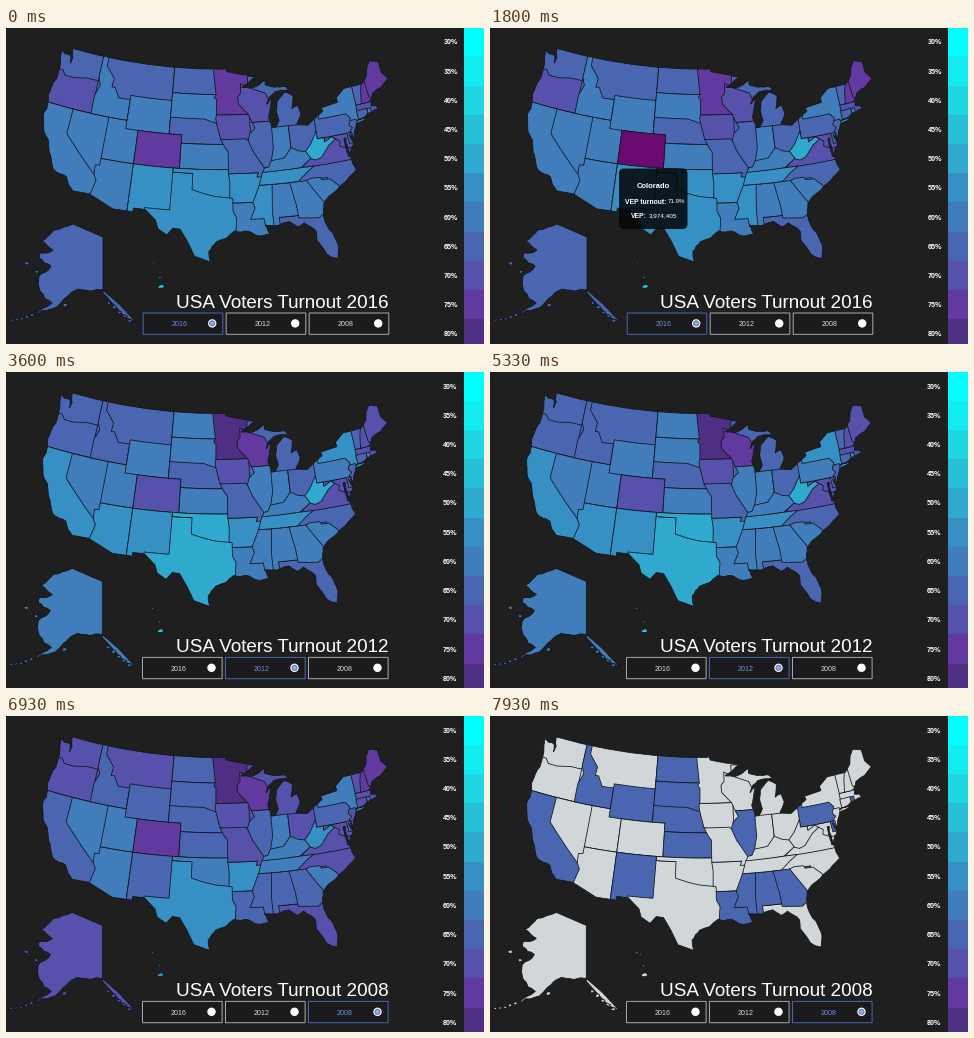
Write a matplotlib script that moves like this. It is 478x316 px and loops after 8000 ms.

```python
import numpy as np
import matplotlib.pyplot as plt
from matplotlib.animation import FuncAnimation
from matplotlib.patches import Circle, FancyBboxPatch, Rectangle

W, H, DPI = 478, 316, 100
PX = 72 / DPI
STEP_MS, FRAMES = 200, 40
SCENE_FRAMES = 9

BG, INK, BLUE, GREY = "#1f1f1f", "#12151c", "#4a66b0", "#d1d6d8"
HOVER = "#6b0a70"
SCALE = ["#00fffe", "#12ecf0", "#1ed6e0", "#26bfd6", "#2fa9ce", "#3690c4",
         "#417dbb", BLUE, "#5651aa", "#623a9f", "#4f2f83"]

# Turnout class (percent) per year; states not listed fall in the 65 class
TURNOUT = {
    2016: {75: "CO MN NH ME", 70: "OR IA WI VA MA MD",
           60: "CA NV ID WY UT AZ SD KS LA IN KY AL GA SC NY RI",
           55: "NM OK TX AR TN MS", 50: "WV", 45: "HI"},
    2012: {80: "MN", 75: "WI", 70: "CO IA VA NH ME MA MD",
           60: "NV WY UT ND SD KS LA IL IN KY MS AL GA SC PA RI AK",
           55: "CA AZ NM AR TN NY", 50: "OK TX WV", 45: "HI"},
    2008: {80: "MN", 75: "CO WI NH ME",
           70: "WA OR MT IA MO MI OH FL NC VA VT MA CT NJ MD AK",
           60: "NV UT AZ OK IN KY TN SC NY", 55: "TX AR WV HI"},
}

rng = np.random.default_rng(4)
fig = plt.figure(figsize=(W / DPI, H / DPI), dpi=DPI, facecolor=BG)
ax = fig.add_axes([0, 0, 1, 1])
ax.axis("off")
regions = {}


def albers(pts):
    """Equal-area conic, degrees west and north to pixels."""
    lon, lat = pts.T
    s1, s2 = np.sin(np.radians([29.5, 45.5]))
    n = (s1 + s2) / 2
    rho = np.sqrt(1 - s1 ** 2 + 2 * n * (s1 - np.sin(np.radians(lat)))) / n
    theta = n * np.radians(96 - lon)
    return np.column_stack([213.3 + 478 * rho * np.sin(theta),
                            478 * rho * np.cos(theta) - 485.5])


def path(*v):
    return np.reshape(v, (-1, 2)).astype(float)


def dense(pts, k=6):
    """Subdivide each side so that parallels bend."""
    t = np.arange(k * (len(pts) - 1) + 1) / k
    i = np.arange(len(pts))
    return np.column_stack([np.interp(t, i, c) for c in pts.T])


def rough(pts, amp=0.09, levels=2):
    """Ragged shoreline by midpoint displacement."""
    for _ in range(levels):
        step = np.diff(pts, axis=0)
        push = rng.uniform(-amp, amp, (len(step), 1))
        mids = pts[:-1] + step / 2 + push * step[:, ::-1] * [-1, 1]
        pts = np.vstack([np.stack([pts[:-1], mids], 1).reshape(-1, 2), pts[-1:]])
    return pts


def fill(code, pts, **kw):
    patch, = ax.fill(*pts.T, ec=INK, lw=0.8 * PX, joinstyle="round", **kw)
    regions.setdefault(code, []).append(patch)
    return patch


# Outline of the mainland; every state is clipped to it
pacific = path(122.76, 49, 122.3, 47.9, 122.5, 47.2, 122.8, 48.1, 124.7, 48.4, 124.1, 46.8,
               124, 45, 124.55, 42.8, 124.1, 41.2, 124.35, 40.4, 123.7, 38.9, 122.5, 37.7,
               121.9, 36.4, 120.6, 34.5, 118.5, 34.03, 117.12, 32.53)
mexico = path(114.72, 32.6, 111.07, 31.33, 108.2, 31.33, 108.2, 31.78, 106.53, 31.78,
              104.9, 30.6, 104.5, 29.65, 103.2, 28.98, 102.4, 29.85, 101.4, 29.77,
              100.3, 28.3, 99.3, 26.6)
gulf = path(97.15, 25.95, 97.4, 27.2, 96.4, 28.4, 93.85, 29.7, 92, 29.6, 90.9, 29.05,
            89, 29.1, 89.5, 30.2, 86.2, 30.4, 85.2, 29.65, 84.2, 30.05, 82.7, 28.8,
            82.8, 27.8, 81.75, 25.95, 80.4, 25.2)
atlantic = path(80.05, 26.5, 80.55, 28.4, 81.4, 30.4, 81.1, 32, 79.2, 33.2, 77.95, 33.9,
                75.55, 35.25, 76, 36.9, 76.3, 37, 76.45, 38.3, 76.4, 39.2, 76.1, 39.2,
                76.2, 38.4, 75.95, 37.15, 75.05, 38.45, 75.5, 39.5, 74.95, 38.95, 74, 40.55,
                71.9, 41.05, 73.8, 40.85, 73.6, 41, 71.2, 41.5, 70, 41.65, 70.2, 42.07,
                71, 42.2, 70.7, 43, 70.2, 43.6, 67, 44.8)
canada = path(67.8, 45.7, 67.8, 47.07, 69.23, 47.45, 70, 46.7, 70.4, 45.8, 71.5, 45,
              74.7, 45, 76.3, 44.1, 76.2, 43.55, 79.05, 43.27, 78.9, 42.85, 81.7, 41.5)
lakes = path(83.45, 41.73, 82.5, 43, 82.95, 44.05, 83.9, 43.7, 83.4, 45.2, 84.75, 45.77,
             86.25, 44.7, 86.5, 43.6, 86.2, 42.5, 86.9, 41.7, 87.5, 41.7, 87.9, 43,
             87, 45.25, 88, 44.55, 87.4, 45.4, 86.5, 45.9, 84, 46, 84.6, 46.45, 86.5, 46.5,
             88, 46.9, 87.9, 47.45, 90.4, 46.6, 92.1, 46.75, 89.6, 48)
north = path(92, 48.3, 94.6, 48.7, 95.15, 49.38, 95.15, 49, 122.76, 49)
outline = np.vstack([rough(pacific), mexico, rough(gulf), rough(atlantic), canada,
                     rough(lakes, 0.05), dense(north)])
land, = ax.fill(*albers(outline).T, fc="none", ec=INK, lw=0.8 * PX, zorder=3)


def state(code, *v):
    pts = path(*v)
    patch = fill(code, albers(dense(np.vstack([pts, pts[:1]]))))
    patch.set_clip_path(land)


def box(code, west, east, south, top):
    state(code, west, top, east, top, east, south, west, south)


# Painted in order: each state overlaps earlier neighbours, so a border is given once
box("WA", 126, 116, 45, 50)
state("OR", 126, 46.2, 123.4, 46.2, 122.8, 45.65, 121.2, 45.65, 119, 46, 115, 46, 115, 42, 126, 42)
box("CA", 126, 114, 32, 42)
state("NV", 120, 42, 113, 42, 113, 35, 114.63, 35, 120, 39)
box("MT", 117, 104.05, 44, 50)
box("UT", 114.04, 109.05, 37, 42)
state("AZ", 114.04, 37, 109.05, 37, 109.05, 31, 115, 31, 114.5, 33, 114.14, 34.3,
      114.63, 35, 114.7, 36.1, 114.04, 36.2)
state("ID", 117.03, 50, 116.05, 50, 116.05, 48, 114.4, 46.65, 114.5, 45.6, 113.9, 45.6,
      113, 44.45, 111.05, 44.5, 111.05, 42, 117.03, 42, 117.1, 44.2, 116.5, 45.5, 117.03, 46.4)
box("WY", 111.05, 104.05, 41, 45)
box("ND", 104.05, 95, 45.94, 50)
box("SD", 104.05, 95, 42, 45.94)
state("NE", 104.05, 43, 98.5, 43, 96.45, 42.5, 94, 42, 94, 40, 102.05, 40, 102.05, 41, 104.05, 41)
box("KS", 102.05, 94, 37, 40)
box("CO", 109.05, 102.05, 37, 41)
box("TX", 107, 93, 25, 36.5)
state("OK", 103, 37, 94, 37, 94, 33.6, 96.5, 33.8, 98.1, 34.1, 100, 34.56, 100, 36.5, 103, 36.5)
state("NM", 109.05, 37, 103, 37, 103.06, 32, 106.62, 32, 106.5, 31, 109.05, 31)

state("MN", 97.23, 50, 96.56, 45.94, 96.85, 45.6, 96.45, 45.3, 96.45, 43.5, 89, 43.5, 89, 50)
state("IA", 96.45, 43.5, 90, 43.5, 90, 40.3, 91.6, 40.3, 95.77, 40.58, 96.45, 42.5, 96.6, 43.1)
state("AR", 94.62, 36.5, 89, 36.5, 89, 33, 94.04, 33, 94.04, 33.55, 94.48, 33.64, 94.43, 35.4)
state("MO", 95.77, 40.58, 91.73, 40.6, 91.42, 40.38, 89, 39, 89, 36, 90.37, 36, 90.1, 36.5,
      94.62, 36.5, 94.62, 39.1, 95.1, 39.6)
state("LA", 94.04, 33, 89, 33, 88, 28, 93.85, 28, 93.55, 31.2, 94.04, 32)
state("MS", 90.1, 35, 88, 35, 88, 30, 89.55, 30, 89.73, 31, 91.6, 31, 90.9, 32.3, 91.17, 33)
box("FL", 88, 79, 24, 31)
state("AL", 88.2, 35, 85, 35, 84.5, 31, 87.6, 31, 87.5, 30, 88.4, 30, 88.47, 31.9)

box("MI", 91, 82, 41, 48)
state("WI", 92.3, 47.2, 90.4, 46.55, 88.1, 45.9, 87.6, 45.1, 86.5, 45, 87, 42.5,
      90.64, 42.5, 91.2, 43.5, 92.75, 44.75, 92.87, 45.6, 92.29, 46.1)
state("IL", 90.64, 42.5, 87, 42.5, 87, 37, 89.15, 37, 90.2, 38.4, 90.7, 39,
      91.42, 40.38, 91.1, 41.2, 90.2, 41.8)
state("IN", 87.53, 41.74, 84.8, 41.74, 84.8, 38, 88.05, 37.7, 87.53, 39.35)
state("OH", 84.8, 41.72, 83.4, 41.73, 80, 42.5, 80, 38, 84.8, 38)

box("NY", 80, 71.5, 40.3, 45.3)
box("NJ", 76, 73.9, 38.8, 41.1)
box("MD", 79.48, 75, 37.9, 39.72)
state("DE", 75.79, 39.72, 75.3, 39.9, 74.9, 38.45, 75.7, 38.46)
state("PA", 80.52, 43, 79.76, 43, 79.76, 42, 75.35, 42, 74.7, 41.36, 75.2, 40.65,
      74.75, 40.2, 75.4, 39.72, 80.52, 39.72)
state("VA", 83.68, 36.5, 75, 36.5, 75, 37.95, 76.2, 37.95, 77.3, 38.4, 77.1, 38.95,
      78, 39.5, 82, 37.6)
box("NC", 84.5, 75, 33.5, 36.57)
state("WV", 80.52, 40.64, 80.52, 39.72, 79.48, 39.72, 79.48, 39.2, 78.3, 39.65, 77.72, 39.32,
      78.87, 38.76, 80.3, 37.5, 81.2, 37.25, 82, 37.5, 82.7, 38.4, 81.7, 39.2)
state("KY", 89.5, 36.4, 83.68, 36.6, 81.97, 37.54, 82.6, 38.42, 83.7, 38.63, 84.8, 39.1,
      86, 38, 88.05, 37.8, 88.5, 37.1, 89.15, 37)
state("TN", 90.1, 35, 84.32, 35, 82.9, 35.95, 81.68, 36.59, 83.68, 36.6, 89.5, 36.5)
state("GA", 85.6, 35, 80, 35, 80, 30.72, 81.5, 30.72, 82.05, 30.4, 84.86, 30.7, 85, 32.3)
state("SC", 83.1, 35, 82.4, 35.2, 81.05, 35.15, 80.8, 34.82, 79.67, 34.8, 78.55, 33.86,
      78, 32, 80.9, 32, 82, 33.5)
box("MA", 73.4, 69, 41.3, 42.73)
box("RI", 71.8, 71.2, 41, 42.02)
box("CT", 73.5, 71.8, 41, 42.04)
box("VT", 73.35, 71.3, 42.73, 45.3)
box("ME", 71.2, 66, 43, 48)
state("NH", 71.5, 45.4, 71.05, 45.4, 70.95, 43.3, 70.6, 42.9, 71.3, 42.7, 72.46, 42.73, 72.05, 44.2)


def islet(code, x, y, r):
    a = np.arange(7) * 2 * np.pi / 7
    fill(code, np.column_stack([x + r * np.cos(a), y + 0.7 * r * np.sin(a)])
         + rng.uniform(-0.3, 0.3, (7, 2)) * r)


# Insets, placed in pixels
shore = path(97, 262, 89, 262, 72, 261, 62, 268, 45, 281, 29, 287, 46, 275, 34, 263,
             33, 248, 45, 238, 33, 230, 34, 225, 47, 222, 36, 213, 48, 202, 67, 196)
handle = path(97, 209, 97, 262, 113, 276, 130, 294, 119, 289, 97, 265)
fill("AK", np.vstack([rough(shore, 0.12), handle]))
for t in np.linspace(0, 1, 5):
    islet("AK", 6 + 20 * t, 292 - 5 * t ** 2, 1.8)
    islet("AK", 103 + 21 * t, 275 + 18 * t, 2.2)
for x, y in ((21, 235), (31, 244), (59, 277)):
    islet("AK", x, y, 2.2)
for x, y, r in ((147.5, 236, 1.2), (151.5, 238, 1.2), (154, 249.5, 1.3), (155.6, 259, 3)):
    islet("HI", x, y, r)


def label(x, y, text, size, color="white", **kw):
    kw = {"ha": "center", "va": "center_baseline", "zorder": 6, **kw}
    return ax.text(x, y, text, fontsize=size * PX, color=color,
                   family="Liberation Sans", **kw)


# Colour scale
for i, c in enumerate(SCALE):
    mid = 13.8 + 29.2 * i
    ax.add_patch(Rectangle((458.4, mid - 14.6), 25, 29.8, fc=c, lw=0))
    label(452, mid, f"{30 + 5 * i}%", 7.2, ha="right", weight="bold")

title = label(383, 280, "", 18.85, ha="right", va="baseline")

# Year buttons
buttons = {}
for i, year in enumerate((2016, 2012, 2008)):
    x = 137.2 + 83 * i
    frame = ax.add_patch(Rectangle((x, 285), 79.6, 21.3, fc="#1b1b1d", lw=PX, snap=False, zorder=4))
    ax.add_patch(Circle((x + 69, 295.4), 4.2, fc="white", lw=0, zorder=5))
    dot = ax.add_patch(Circle((x + 69, 295.4), 2.6, fc="#8fa8e0", ec=BLUE, lw=0.8 * PX, zorder=6))
    buttons[year] = frame, dot, label(x + 36, 295.7, str(year), 7.1)

# Tooltip
tip = [
    ax.add_patch(FancyBboxPatch((134, 145.5), 58.5, 50.5, boxstyle="round,pad=5,rounding_size=5",
                                fc="#05070a", lw=0, alpha=0.87, zorder=5)),
    label(163, 157, "Colorado", 7.6, weight="bold"),
    label(176, 173, "VEP turnout:", 6.8, ha="right", weight="bold"),
    label(178, 173, "71.9%", 6.2, ha="left"),
    label(157, 187, "VEP:", 6.8, ha="right", weight="bold"),
    label(159, 187, "3,974,405", 6.4, ha="left"),
]


def turnout(year):
    classes = dict.fromkeys(regions, 65)
    for value, codes in TURNOUT[year].items():
        classes.update(dict.fromkeys(codes.split(), value))
    return classes


def draw(i):
    scene = i // SCENE_FRAMES
    year = (2016, 2016, 2012, 2008, 2008)[scene]
    hover, filtered = scene == 1, scene == 4

    # The page sits slightly further left once the year changes
    dx, dy = (0.7, -0.4) if scene > 1 else (0, 0)
    ax.set_xlim(dx, W + dx)
    ax.set_ylim(H + dy, dy)

    for code, value in turnout(year).items():
        color = SCALE[(value - 30) // 5]
        if filtered and value != 65:
            color = GREY
        if hover and code == "CO":
            color = HOVER
        for patch in regions[code]:
            patch.set_facecolor(color)

    title.set_text(f"USA Voters Turnout {year}")
    for y, (frame, dot, text) in buttons.items():
        on = y == year
        frame.set_edgecolor(BLUE if on else "#a8a8a8")
        text.set_color("#6d8fd8" if on else "#d8d8d8")
        dot.set_visible(on)
    for part in tip:
        part.set_visible(hover)
    return []


anim = FuncAnimation(fig, draw, frames=FRAMES, interval=STEP_MS, repeat=True)
plt.show()
```
